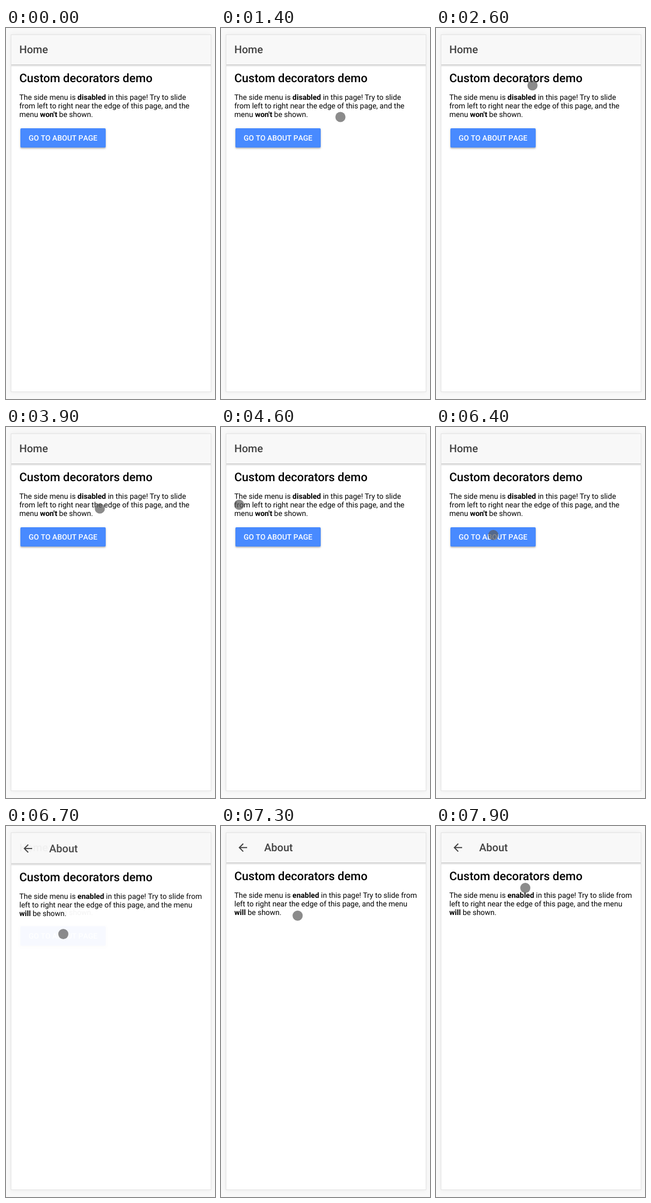
Animation, 392 px wide and 692 px high, one loop 8 s. Source, as an HTML page:

```html
<!DOCTYPE html>
<html lang="en">
<head>
<meta charset="utf-8">
<title>Side menu demo</title>
<style>
  html, body { margin: 0; width: 100%; height: 100%; overflow: hidden; background: #f9f9f9; }
  svg { display: block; width: 392px; height: 692px; font-family: Roboto, sans-serif; text-rendering: geometricPrecision; }
  .title { font-size: 20px; font-weight: 500; fill: #424242; }
  .heading { font-size: 22px; font-weight: 500; }
  .body { font-size: 14px; white-space: pre; }
  .label { font-size: 14px; font-weight: 500; fill: #fff; font-kerning: none; }
  .bold { font-weight: 700; }
  .frame { filter: drop-shadow(0 0 5px rgba(0, 0, 0, .06)); }
  .button { filter: drop-shadow(0 2px 1px rgba(0, 0, 0, .2)) drop-shadow(0 1px 2px rgba(0, 0, 0, .12)); }
</style>
</head>
<body>
<svg viewBox="0 0 392 692">
  <defs>
    <clipPath id="screen"><rect x="9" y="12" width="375" height="667"/></clipPath>
    <linearGradient id="shade" x2="0" y2="1">
      <stop offset="0" stop-opacity=".24"/>
      <stop offset=".4" stop-opacity=".1"/>
      <stop offset="1" stop-opacity="0"/>
    </linearGradient>
    <g id="chrome">
      <rect x="9" y="12" width="375" height="667" fill="#fff"/>
      <rect x="9" y="12" width="375" height="56" fill="#f8f8f8"/>
      <rect x="9" y="68" width="375" height="5" fill="url(#shade)"/>
      <text class="heading" x="25" y="101">Custom decorators demo</text>
    </g>
  </defs>

  <rect width="392" height="692" fill="#f9f9f9"/>
  <rect class="frame" x="9" y="12" width="375" height="667" fill="#fff"/>

  <g clip-path="url(#screen)">
    <g id="home">
      <use href="#chrome"/>
      <text class="title" x="25" y="47">Home</text>
      <text class="body" x="25" y="134">The side menu is <tspan class="bold">disabled</tspan> in this page! Try to slide</text>
      <text class="body" x="25" y="150">from left to right near the edge of this page, and the</text>
      <text class="body" x="25" y="166">menu <tspan class="bold">won't</tspan> be shown.</text>
      <rect class="button" x="27" y="187" width="160" height="36" rx="2" fill="#488aff"/>
      <text class="label" x="107" y="210" text-anchor="middle">GO TO ABOUT PAGE</text>
    </g>
    <g id="about">
      <use href="#chrome"/>
      <path fill="#424242" transform="translate(29 28.3) scale(.046875)"
        d="M427 234.6H167.3L287 115 256 85 85 256l171 171 30-30-118.7-119.6H427z"/>
      <text class="title" x="81" y="47">About</text>
      <text class="body" x="25" y="134">The side menu is <tspan class="bold">enabled</tspan> in this page! Try to slide from</text>
      <text class="body" x="25" y="150">left to right near the edge of this page, and the menu</text>
      <text class="body" x="25" y="166"><tspan class="bold">will</tspan> be shown.</text>
    </g>
  </g>

  <rect x="9.5" y="12.5" width="375" height="666" fill="none" stroke="#e2e2e2"/>
  <circle id="pointer" r="9.5" fill="#5a5a5a" fill-opacity=".7"/>
</svg>
<script>
  const LOOP = 8000, STEP = 100;
  const PAGE_IN = 6545, PAGE_TIME = 280, PAGE_SHIFT = 40;

  // Where the pointer turns; it eases from one stop to the next.
  const stops = [
    { at: 1200, x: 320, y: 108 },
    { at: 1400, x: 224, y: 166 },
    { at: 1900, x: 142, y: 130 },
    { at: 2600, x: 181, y: 107 },
    { at: 3300, x: 23, y: 150 },
    { at: 3900, x: 176, y: 152 },
    { at: 4400, x: 23, y: 146 },
    { at: 5400, x: 128, y: 137 },
    { at: 5900, x: 107.5, y: 201.5 },
    { at: 6900, x: 107.5, y: 201.5 },
    { at: 7700, x: 180, y: 133 },
    { at: 7900, x: 167.5, y: 115.5 }
  ];

  const $ = id => document.getElementById(id);
  const clamp = v => Math.min(1, Math.max(0, v));
  const smooth = k => k * k * (3 - 2 * k);
  const mix = (a, b, k) => a + (b - a) * k;
  const bezier = (s, a, b) => 3 * (1 - s) ** 2 * s * a + 3 * (1 - s) * s * s * b + s ** 3;

  // cubic-bezier(.36, .66, .04, 1)
  function ease(p) {
    let lo = 0, hi = 1;
    for (let i = 0; i < 24; i++) {
      const mid = (lo + hi) / 2;
      if (bezier(mid, .36, .04) < p) lo = mid; else hi = mid;
    }
    return bezier(hi, .66, 1);
  }

  function drawPointer(t) {
    const to = stops.find(s => s.at > t) || stops[stops.length - 1];
    const from = stops[Math.max(0, stops.indexOf(to) - 1)];
    const k = smooth(clamp((t - from.at) / (to.at - from.at || 1)));
    const pointer = $('pointer');
    pointer.setAttribute('visibility', t < stops[0].at ? 'hidden' : 'visible');
    pointer.setAttribute('cx', mix(from.x, to.x, k));
    pointer.setAttribute('cy', mix(from.y, to.y, k));
  }

  function drawPage(t) {
    const progress = ease(clamp((t - PAGE_IN) / PAGE_TIME));
    const about = $('about');
    about.setAttribute('visibility', t < PAGE_IN ? 'hidden' : 'visible');
    about.setAttribute('opacity', progress);
    about.setAttribute('transform', `translate(0 ${PAGE_SHIFT * (1 - progress)})`);
  }

  const start = performance.now();
  function tick() {
    const elapsed = (performance.now() - start) % LOOP;
    const t = Math.floor(elapsed / STEP) * STEP;
    drawPage(t);
    drawPointer(t);
    requestAnimationFrame(tick);
  }
  tick();
</script>
</body>
</html>
```
